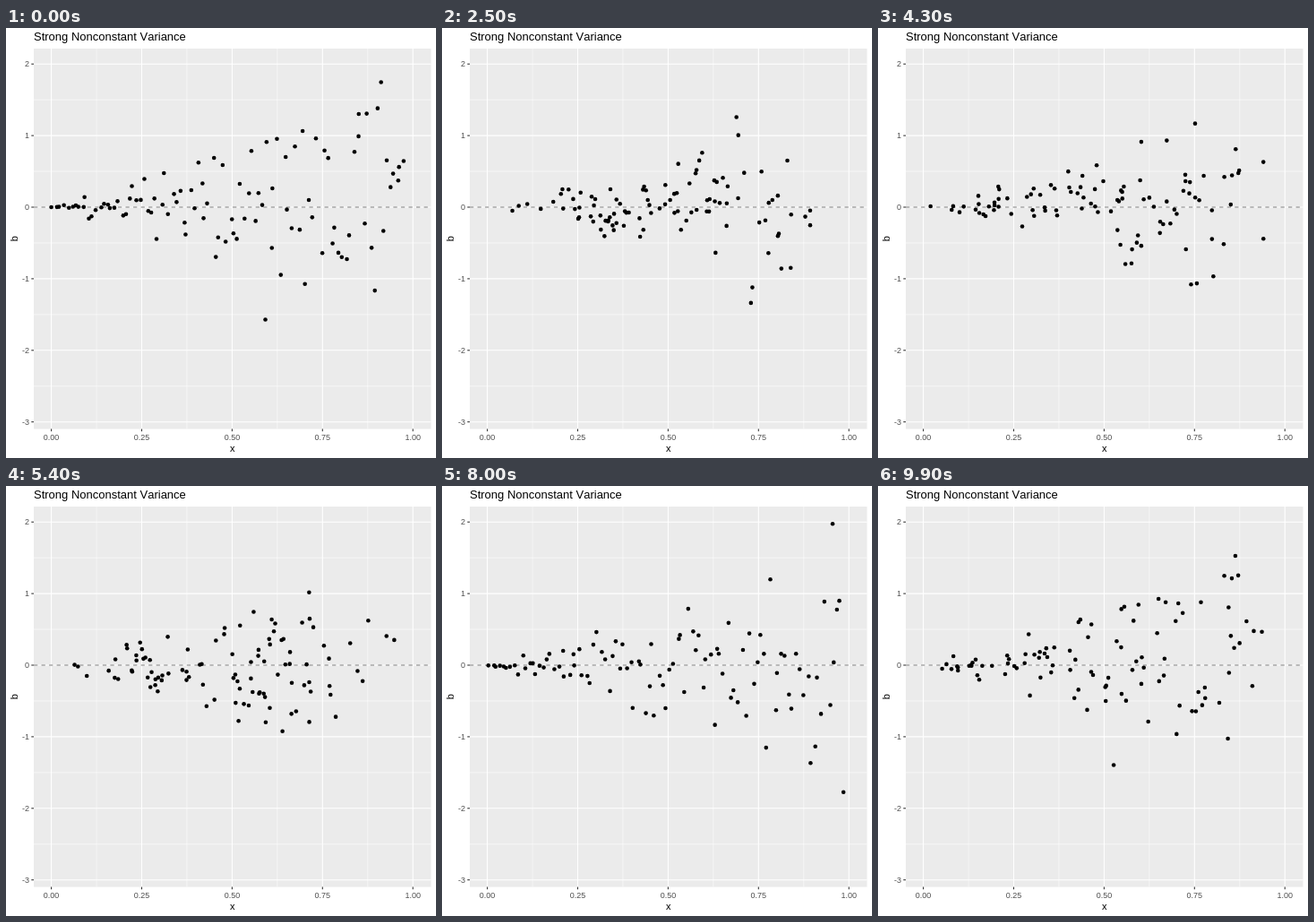
Animation of 480 by 480 pixels, one loop 10000 ms. Source, as an HTML page:

```html
<!DOCTYPE html>
<html>
<head>
<meta charset="utf-8">
<title>Strong Nonconstant Variance</title>
<style>
  html, body { margin: 0; width: 480px; height: 480px; overflow: hidden; background: #fff; }
  svg { display: block; font: 11px "Liberation Sans", Arial, sans-serif; font-kerning: none; }
  .title { font-size: 13px; }
  .tick { font-size: 9px; fill: #4d4d4d; }
</style>
</head>
<body>
<svg id="plot" width="480" height="480" viewBox="0 0 480 480"></svg>
<script>
const COUNT = 100, STEP = 100, STEPS_PER_STATE = 10;
const LEFT = 31, RIGHT = 474.5, TOP = 23, BOTTOM = 447.6;
const px = x => 50.6 + 403.6 * x;
const py = b => 200 - 79.9 * b;
const plot = document.getElementById('plot');

function add(tag, attrs, text = '') {
  const el = document.createElementNS('http://www.w3.org/2000/svg', tag);
  for (const name in attrs) el.setAttribute(name, attrs[name]);
  el.textContent = text;
  return plot.appendChild(el);
}
const line = (x1, y1, x2, y2, stroke, width = 1.07, extra = {}) =>
  add('line', { x1, y1, x2, y2, stroke, 'stroke-width': width, ...extra });
const vertical = (x, width) => line(px(x), TOP, px(x), BOTTOM, '#fff', width);
const horizontal = (b, width) => line(LEFT, py(b), RIGHT, py(b), '#fff', width);

function drawAxes() {
  add('rect', { x: LEFT, y: TOP, width: RIGHT - LEFT, height: BOTTOM - TOP, fill: '#ebebeb' });
  for (let x = 0.125; x < 1; x += 0.25) vertical(x, 0.53);
  for (let b = -2.5; b < 2; b++) horizontal(b, 0.53);
  for (let x = 0; x <= 1; x += 0.25) {
    vertical(x);
    line(px(x), BOTTOM, px(x), BOTTOM + 2.7, '#333');
    add('text', { x: px(x), y: 460, 'text-anchor': 'middle', class: 'tick' }, x.toFixed(2));
  }
  for (let b = -3; b <= 2; b++) {
    horizontal(b);
    line(LEFT - 2.7, py(b), LEFT, py(b), '#333');
    add('text', { x: 26, y: py(b) + 3.2, 'text-anchor': 'end', class: 'tick' }, b);
  }
  line(LEFT, py(0), RIGHT, py(0), '#7f7f7f', 1.07, { 'stroke-dasharray': '4.27 4.27' });
  add('text', { x: LEFT, y: 14, class: 'title' }, 'Strong Nonconstant Variance');
  add('text', { x: 252.7, y: 473, 'text-anchor': 'middle' }, 'x');
  add('text', { transform: 'translate(13 235.3) rotate(-90)', 'text-anchor': 'middle' }, 'b');
}

let seed = 41;
function random() {
  seed = (seed * 48271) % 2147483647;
  return seed / 2147483647;
}
const normal = () => Math.sqrt(-2 * Math.log(random())) * Math.cos(2 * Math.PI * random());
const clamp = (v, limit) => Math.max(-limit, Math.min(limit, v));

// Extreme points [x, b] of each state; the others spread in proportion to x.
const extremes = [
  [[.912, 1.745], [.592, -1.57]],
  [[.95, -2.86]],
  [[.9, 1.9]],
  [[.93, -2.09], [.88, 1.6]],
  [[.86, 1.58]],
  [[.9, 1.53]],
  [[.94, -2.39]],
  [[.97, 1.79], [.89, -2.26]],
  [[.955, 1.975], [.985, -1.775]],
  [[.93, 1.93], [.96, -1.68]]
];

// A random row order makes points travel between unrelated places.
function shuffle(list) {
  for (let i = list.length - 1; i > 0; i--) {
    const j = Math.floor(random() * (i + 1));
    [list[i], list[j]] = [list[j], list[i]];
  }
  return list;
}

function sample(known) {
  const points = Array.from({ length: COUNT - known.length }, (_, i) => {
    const x = (i + random()) / COUNT;
    return [x, 0.9 * x * clamp(normal(), 1.7)];
  });
  return shuffle([...points, ...known]);
}

const states = extremes.map(sample);
drawAxes();
const dots = Array.from({ length: COUNT }, () => add('circle', { r: 2.3 }));

function draw(time) {
  const tick = Math.floor(time / STEP) % (states.length * STEPS_PER_STATE);
  const state = Math.floor(tick / STEPS_PER_STATE), step = tick % STEPS_PER_STATE;
  // Every state but the first rests for one extra step.
  const progress = state ? Math.max(0, step - 1) / 9 : step / 10;
  const from = states[state], to = states[(state + 1) % states.length];
  const mix = (i, axis) => from[i][axis] + (to[i][axis] - from[i][axis]) * progress;
  dots.forEach((dot, i) => {
    dot.setAttribute('cx', px(mix(i, 0)));
    dot.setAttribute('cy', py(mix(i, 1)));
  });
  requestAnimationFrame(draw);
}
draw(performance.now());
</script>
</body>
</html>
```
